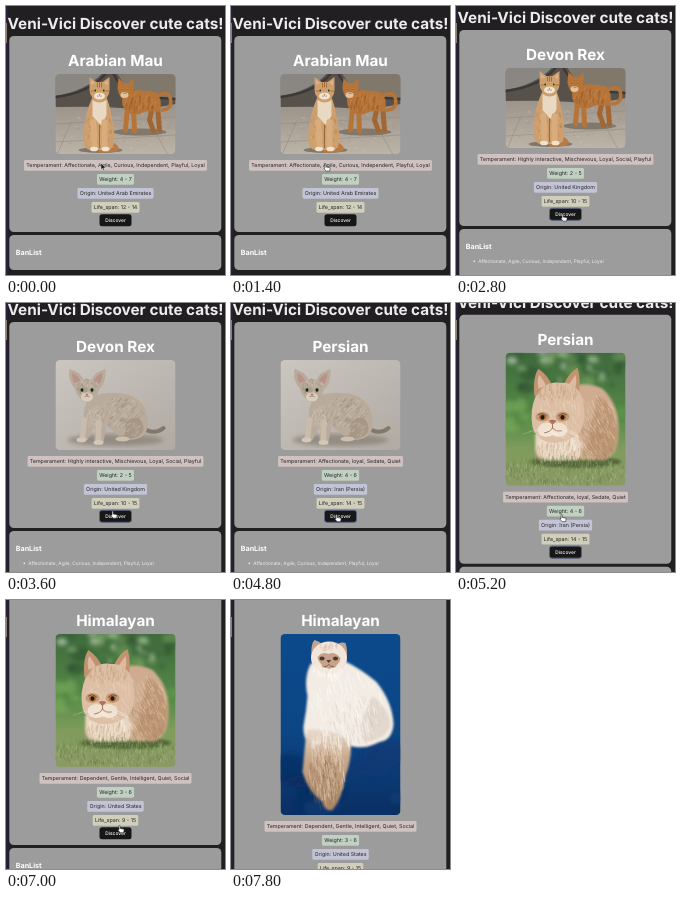
These frames come from a looping animation (219 px wide and 269 px high, 8000 ms). An HTML page:

```html
<!DOCTYPE html>
<html lang="en">
<head>
<meta charset="utf-8">
<title>Discover cute cats</title>
<style>
  html, body { margin: 0; width: 100%; height: 100%; overflow: hidden; background: #211f21; }
  svg { display: block; width: 219px; height: 269px; }
  text { font-family: Inter, "Open Sans", sans-serif; text-rendering: geometricPrecision; }
  .h1 { font-size: 15.3px; font-weight: 700; text-anchor: middle; fill: #fff; }
  .h3 { font-size: 7.15px; font-weight: 700; fill: #fff; }
  .label { font-size: 5.35px; text-anchor: middle; fill: #262426; }
  .button { font-size: 4.9px; font-weight: 500; text-anchor: middle; fill: #fff; }
  .item { font-size: 4.77px; fill: #eee; }
</style>
</head>
<body>
<svg viewBox="0 0 219 269">
  <defs>
    <linearGradient id="ground" x2="0" y2="1"><stop offset=".3" stop-color="#978e84"/><stop offset="1" stop-color="#bdb4a8"/></linearGradient>
    <linearGradient id="studio" x2="1" y2="1"><stop stop-color="#cbc6c0"/><stop offset="1" stop-color="#b0aaa3"/></linearGradient>
    <linearGradient id="garden" x2="0" y2="1"><stop stop-color="#3f6a3c"/><stop offset=".5" stop-color="#578a48"/><stop offset=".72" stop-color="#7f9c5c"/><stop offset="1" stop-color="#8c9a66"/></linearGradient>
    <linearGradient id="cloth" x2="0" y2="1"><stop stop-color="#0b4a8c"/><stop offset=".55" stop-color="#0c4584"/><stop offset="1" stop-color="#0a2f64"/></linearGradient>
    <linearGradient id="tail" x2="0" y2="1"><stop stop-color="#e9dccf"/><stop offset=".35" stop-color="#c9a98c"/><stop offset="1" stop-color="#a98462"/></linearGradient>
    <filter id="soft"><feGaussianBlur stdDeviation=".45"/></filter>
    <filter id="fluff"><feGaussianBlur stdDeviation="1.1"/></filter>
    <filter id="blur"><feGaussianBlur stdDeviation="2.2"/></filter>
  </defs>
  <rect width="219" height="269" fill="#211f21"/>
  <rect width="1.6" height="269" fill="#2b2140"/>
  <rect y="17" width="1" height="20" fill="#8a7d74"/>
  <g id="page">
    <text class="h1" x="109.5" y="22.7" style="fill:#ececec">Veni-Vici Discover cute cats!</text>
    <rect id="card" x="3.3" y="30" width="212" rx="4.5" fill="#9c9c9c"/>
    <text id="name" class="h1" x="109.5" y="60"></text>
    <g id="photo" transform="translate(49.5 68)"></g>
    <g id="below">
      <g id="labels"></g>
      <rect id="button" x="93.5" y="60.3" width="32" height="12" rx="2.5" fill="#171717"/>
      <text class="button" x="109.5" y="68">Discover</text>
      <rect id="banCard" x="3.3" y="81" width="212" rx="4.5" fill="#9c9c9c"/>
      <text class="h3" x="9.8" y="101">BanList</text>
      <g id="ban">
        <circle cx="18.3" cy="113.4" r=".8" fill="#eee"/>
        <text class="item" x="22.3" y="115">Affectionate, Agile, Curious, Independent, Playful, Loyal</text>
      </g>
    </g>
  </g>
  <g id="cursor">
    <path id="arrow" d="M0 0V6.6L1.5 5.3L2.5 7.5L3.6 7L2.6 4.9H4.7Z" fill="#111" stroke="#eee" stroke-width=".5"/>
    <path id="hand" d="M0 .7Q0 0 .65 0T1.3 .7V3L4.5 3.5Q5.2 3.8 5.1 4.6L4.6 7.2H1.2L-1 4.7Q-1 3.7 0 4.2Z" fill="#fff" stroke="#222" stroke-width=".6"/>
  </g>
</svg>
<script>
const LOOP = 8000, STEP = 200;
const $ = id => document.getElementById(id);

const breeds = [
  { at: 0, name: 'Arabian Mau', facts: ['Affectionate, Agile, Curious, Independent, Playful, Loyal', '4 - 7', 'United Arab Emirates', '12 - 14'] },
  { at: 2600, name: 'Devon Rex', facts: ['Highly interactive, Mischievous, Loyal, Social, Playful', '2 - 5', 'United Kingdom', '10 - 15'] },
  { at: 4400, name: 'Persian', facts: ['Affectionate, loyal, Sedate, Quiet', '4 - 6', 'Iran (Persia)', '14 - 15'] },
  { at: 6800, name: 'Himalayan', facts: ['Dependent, Gentle, Intelligent, Quiet, Social', '3 - 6', 'United States', '9 - 15'] }
];
const fields = [['Temperament', '#d0c2c0'], ['Weight', '#c0d0c1'], ['Origin', '#c2c4d5'], ['Life_span', '#d0cfbc']];
const photos = [
  { at: 0, h: 80, draw: street },
  { at: 3200, h: 90, draw: kitten },
  { at: 5000, h: 133, draw: lawn },
  { at: 7400, h: 181, draw: fluffy }
];
const scroll = [[0, 0], [1400, 0], [1600, 6], [3200, 6], [3600, 11], [5000, 11], [5600, 32.5], [6600, 32.5], [6800, 34]];
const pointer = [[0, 95, 157], [600, 94, 158], [1600, 94, 158], [2400, 106, 208], [3600, 106, 208], [4000, 105, 211.5], [5200, 105, 211.5], [5800, 115.7, 207.5], [6200, 115.7, 207.5], [6800, 113, 225.5]];

// Drawing helpers for the photos
let seed = 7;
const rnd = () => (seed = (seed * 16807) % 2147483647) / 2147483647;
const n1 = v => v.toFixed(1);
const path = (d, fill, extra = '') => `<path d="${d}" fill="${fill}" ${extra}/>`;
const line = (d, color, w, extra = '') => path(d, 'none', `stroke="${color}" stroke-width="${w}" stroke-linecap="round" stroke-linejoin="round" ${extra}`);
const oval = (x, y, rx, ry, fill, extra = '') => `<ellipse cx="${x}" cy="${y}" rx="${rx}" ry="${ry}" fill="${fill}" ${extra}/>`;
const back = (h, id) => `<rect width="120" height="${h}" fill="url(#${id})"/>`;
const soft = (s, id = 'soft') => `<g filter="url(#${id})">${s}</g>`;

// Short strokes scattered in an oval, leaning along (dx, dy)
function hair(x, y, rx, ry, color, n, dx, dy, w = .7) {
  let d = '';
  for (let i = 0; i < n; i++) {
    const a = rnd() * Math.PI * 2, r = Math.sqrt(rnd()), k = .5 + rnd();
    d += `M${n1(x + Math.cos(a) * rx * r)} ${n1(y + Math.sin(a) * ry * r)}l${n1(dx * k + rnd() - .5)} ${n1(dy * k)}`;
  }
  return line(d, color, w, 'opacity=".45"');
}

// Blurred spots scattered over a box
function spots(x, y, w, h, n, size, colors) {
  let s = '';
  for (let i = 0; i < n; i++)
    s += oval(n1(x + rnd() * w), n1(y + rnd() * h), n1(size * (.5 + rnd())), n1(size * (.4 + rnd() * .8)), colors[i % colors.length], 'opacity=".6"');
  return soft(s, 'blur');
}

function face(x, y, gap, eye, r, nose) {
  const eyes = [-gap, gap].map(g => oval(x + g, y, r, r * .8, eye) + oval(x + g, y, r * .5, r * .7, '#201a16')).join('');
  return eyes + path(`M${x - r * .7} ${y + gap * .75}h${r * 1.4}l${-r * .7} ${r}Z`, nose)
    + line(`M${x - gap * .5} ${y + gap * 1.3}q${gap * .25} ${r * .4} ${gap * .5} ${-r * .3}q${gap * .25} ${r * .7} ${gap * .5} ${r * .3}`, '#6d4a38', .5);
}

function street() {
  const o = '#b67438', tan = '#cd9f6e';
  return back(80, 'ground') + soft(
    path('M0 0H120V30Q92 36 66 34T0 33Z', '#57514b') +
    path('M0 0H46Q30 17 0 22Z', '#8a8782') +
    path('M62 0H120V24Q88 27 72 16Z', '#81786c') +
    line('M0 23Q34 19 50 0M58 0Q68 23 120 25', '#3c3835', 2.4) +
    hair(60, 58, 60, 20, '#d0c8bc', 60, 2, .2) + hair(60, 58, 60, 20, '#928779', 60, 2, .2) +
    line('M0 50L120 43M0 68L120 61M16 47L2 80M92 44L112 80', '#958b7f', .6) +
    oval(84, 58, 27, 3.5, '#81776b') + oval(45, 76, 22, 3, '#81776b')
  ) + soft(
    line('M101 23Q113 15 115 25T107 36', o, 3.5) +
    line('M72 33L70 56M78 34L79 57', o, 5) + line('M97 32L94 46L98 57M102 31L104 56', '#a36631', 5) +
    path('M66 17Q84 15 100 18Q108 25 104 38Q92 35 84 40Q71 43 67 31Z', o) +
    hair(86, 28, 16, 8, '#8b5226', 34, -.8, 4, .9) + hair(86, 26, 16, 8, '#d19659', 28, -.8, 3) +
    path('M62 13L63 4L68 9H73L78 4L78 16Q76 25 70 25T62 15Z', o) +
    oval(69, 21, 4, 3, '#e0c39e') + face(69.5, 15.5, 3, '#d9c15e', 1.1, '#a5674d') +
    line('M55 69Q65 75 59 76L45 77', '#b87b44', 4) +
    path('M37 23Q30 38 28 58Q26 76 36 76H54Q61 72 58 55Q56 36 51 23Z', tan) +
    hair(43, 51, 14, 20, '#aa7141', 55, .8, 3) + hair(42, 55, 13, 19, '#dfb88b', 55, .5, 3) +
    path('M37 26Q44 31 51 26L51 42L45 51L37 42Z', '#ead9c2') +
    line('M38 48L39 74M49 48L49 74', '#d9ac7c', 6) + line('M44 51V74', '#8f6340', .9) +
    oval(38.5, 75, 4, 2.3, '#efe3d1') + oval(50, 75, 4, 2.3, '#efe3d1') +
    path('M34 15L34 3L41 8H47L54 3L54 16Q54 25 44 27Q34 25 34 15Z', tan) +
    path('M35.5 11L35.5 6L39.5 9Z M52.5 11L52.5 6L48.5 9Z', '#dfb099') +
    line('M42 9V13M44 8V13M46 9V13M36 17h3M50 17h3', '#9a6134', .8) +
    oval(44, 22, 5.5, 3.6, '#f0e4d2') + face(44, 16.5, 4.3, '#c8b84f', 1.6, '#c27f6a'));
}

function kitten() {
  const fur = '#b9ab9b', dark = '#85786a';
  return back(90, 'studio') + soft(oval(60, 80, 48, 6, '#938c83'), 'blur') + soft(
    line('M85 67Q99 76 108 68', dark, 4) +
    path('M35 37Q57 29 77 36Q94 45 92 67Q90 80 72 80L62 75L51 65L48 82L39 83L39 66L32 80L23 80L29 61Q26 47 35 37Z', fur) +
    hair(65, 52, 23, 15, dark, 110, -1.8, 2.3) + hair(65, 52, 23, 15, '#d8cbbb', 110, -1.5, 2) +
    hair(39, 58, 8, 14, '#dbcfc0', 55, .3, 2.5) +
    path('M71 61Q85 52 88 67Q88 78 72 79H61Q60 76 69 75Z', '#a69786') +
    hair(77, 69, 9, 7, '#d6c8b8', 30, -1.5, 1.5) +
    line('M29 60L27 78M43 62L43 81', '#c9bcad', 5.5) +
    oval(26, 80, 5, 2.4, '#d3c7b9') + oval(43, 82.5, 5, 2.5, '#d3c7b9') + oval(67, 79, 7, 2.5, '#cdbfae') +
    path('M19 28Q12 20 14 9Q23 11 28 19H36Q41 11 50 9Q51 22 44 29Q41 39 32 43Q22 39 19 28Z', fur) +
    path('M19 23Q16 18 17 13Q22 15 25 21Z M44 24Q47 19 47 13Q41 15 38 21Z', '#b8928a') +
    hair(32, 26, 10, 8, dark, 40, .3, 2) + hair(32, 25, 10, 8, '#d8ccbd', 30, .3, 2) +
    oval(31.5, 37, 6, 4.5, '#d9cdbf') + face(31.5, 30, 5, '#8f9a72', 2.6, '#a37e74'));
}

function lawn() {
  const cream = '#dcbfa4', warm = '#c0946f';
  return back(133, 'garden') +
    spots(0, 0, 120, 50, 26, 7, ['#2c4f2e', '#6f9a5c', '#37603a']) +
    spots(0, 0, 60, 28, 9, 4, ['#d5dfcf', '#8fb27c']) + spots(80, 0, 40, 30, 7, 4, ['#b9cfa8', '#7ea568']) +
    spots(0, 52, 120, 30, 16, 7, ['#5f9a4b', '#7bab5a']) + soft(
      oval(70, 109, 46, 6, '#56683a') +
      path('M52 38Q78 26 97 36Q114 52 113 78Q113 104 98 107H40Q27 106 30 92Q34 72 52 38Z', '#cfac8f') +
      path('M92 42Q112 56 112 80Q111 104 96 106Q76 104 84 82Z', '#bd9676') +
      path('M30 82Q45 74 72 80Q82 96 72 107H40Q28 105 30 82Z', '#e8d5c1'), 'fluff') +
    soft(
      hair(88, 70, 22, 30, '#ead3ba', 150, 2, 4) + hair(90, 84, 20, 20, '#a47c5a', 80, 2, 4) +
      hair(52, 92, 20, 13, '#fbf1e4', 100, -.5, 5) + hair(54, 95, 22, 10, '#b8946f', 50, -.5, 5) +
      path('M29 44Q27 24 33 16Q43 23 47 34Z M58 32Q64 19 72 15Q76 28 73 42Z', warm) +
      path('M33 36Q31 26 34 22L41 33Z M63 32L70 22Q72 30 69 37Z', '#e0b9a2') +
      path('M30 44Q40 27 55 30Q71 29 77 46Q82 68 74 80Q62 91 46 90Q31 88 27 74Q24 58 30 44Z', cream) +
      hair(52, 42, 20, 10, warm, 70, .2, -4) + hair(54, 60, 22, 22, '#f0dcc6', 110, 1, 4) +
      oval(37, 64, 7, 5, '#c39c7c') + oval(57, 64, 7, 5, '#c39c7c') +
      oval(41, 77, 9, 7, '#f0e0ce') + oval(53, 77, 9, 7, '#f0e0ce') +
      oval(37, 64.5, 3.6, 2.9, '#b8732c') + oval(57, 64.5, 3.6, 2.9, '#b8732c') +
      oval(37, 64.5, 2, 2.3, '#221914') + oval(57, 64.5, 2, 2.3, '#221914') +
      line('M33 62Q37 59 41 63M53 63Q57 59 61 62', '#684733', 1) +
      path('M43 68Q47 66 51 68L47 72Z', '#b66e5c') +
      line('M47 72V75M39 80Q45 79 47 75Q50 79 56 78', '#8a5e48', .8) +
      hair(39, 79, 14, 4, '#fff', 18, -6, 2, .4) + hair(56, 80, 12, 4, '#fff', 18, 8, 3, .4)) +
    soft(hair(60, 120, 64, 15, '#c0c68e', 170, .5, -3) + hair(60, 120, 64, 15, '#566f3c', 170, -.5, -3) +
      hair(60, 112, 60, 7, '#71914d', 90, .5, -5));
}

function fluffy() {
  const white = '#f3ece5', brown = '#a5765a';
  return back(181, 'cloth') + spots(0, 110, 120, 65, 12, 14, ['#0a2c60', '#0c3a74']) + soft(
    path('M30 30Q48 22 66 28Q82 36 96 48Q112 68 113 90Q112 106 99 108Q84 116 70 112L40 118Q22 112 23 92Q26 76 27 62Q23 44 30 30Z', white) +
    path('M92 62Q110 76 110 92Q104 106 84 108Q76 92 92 62Z', '#e3d8ce') +
    path('M26 96Q44 92 70 106Q72 124 65 142Q62 164 52 176Q44 178 42 168Q28 158 22 138Q24 116 26 96Z', 'url(#tail)'), 'fluff') +
    soft(
      hair(66, 70, 36, 34, '#fff', 150, 1.5, 6) + hair(76, 84, 28, 24, '#cfc2b6', 70, 1.5, 6) +
      hair(44, 140, 17, 28, '#8a6448', 110, .8, 7) + hair(46, 130, 18, 32, '#f0dfcd', 110, .8, 7) +
      hair(50, 104, 20, 9, '#fff8f0', 80, .5, 7) +
      path('M31 24Q30 10 34 6Q41 8 46 14Z M53 13Q59 7 65 9Q68 17 65 27Z', '#c3a38d') +
      oval(48.5, 24, 18, 16.5, '#f2e6db') + hair(48, 36, 15, 7, '#fff', 60, 0, 4) +
      hair(48, 14, 11, 4, '#c6a58b', 24, 0, -3) +
      path('M37 23Q42 17 48 20Q54 17 60 24Q60 31 49 35Q38 31 37 23Z', brown, 'opacity=".6"') +
      oval(45, 31, 4, 3, '#c7a48a') + oval(52, 31, 4, 3, '#c7a48a') +
      oval(41.5, 24.5, 2.6, 1.9, '#563725') + oval(55, 24.5, 2.6, 1.9, '#563725') +
      path('M45.8 26H50.6L48.2 29Z', '#593a2b') + line('M44 32.5Q46.5 33 48.2 30.5Q50 33 53 32.5', '#6d4a38', .7));
}

$('photo').innerHTML = photos.map((p, i) =>
  `<clipPath id="clip${i}"><rect width="120" height="${p.h}" rx="4.5"/></clipPath><g id="photo${i}" clip-path="url(#clip${i})">${p.draw()}</g>`).join('');
$('labels').innerHTML = fields.map(([, color], i) =>
  `<rect y="${6 + 14 * i}" height="10.7" rx="1.4" fill="${color}"/><text class="label" x="109.5" y="${13.2 + 14 * i}"></text>`).join('');

const latest = (list, t) => list.findLastIndex(s => s.at <= t);

function at(track, t, k) {
  const i = track.findLastIndex(p => p[0] <= t), a = track[i], b = track[i + 1];
  return b ? a[k] + (b[k] - a[k]) * (t - a[0]) / (b[0] - a[0]) : a[k];
}

const show = (id, on) => $(id).setAttribute('display', on ? 'inline' : 'none');

function render(t) {
  const breed = breeds[latest(breeds, t)], pic = latest(photos, t);
  const bottom = 68 + photos[pic].h, banned = t >= 1600, focused = t >= 2600 && t < 5400;
  $('name').textContent = breed.name;
  document.querySelectorAll('.label').forEach((label, i) => {
    label.textContent = `${fields[i][0]}: ${breed.facts[i]}`;
    const w = label.getComputedTextLength() + 4.4, box = label.previousElementSibling;
    box.setAttribute('x', 109.5 - w / 2);
    box.setAttribute('width', w);
  });
  photos.forEach((p, i) => show('photo' + i, i === pic));
  $('card').setAttribute('height', bottom + 78 - 30);
  $('banCard').setAttribute('height', banned ? 49 : 35);
  show('ban', banned);
  $('below').setAttribute('transform', `translate(0 ${bottom})`);
  $('page').setAttribute('transform', `translate(0 ${-at(scroll, t, 1)})`);
  $('button').setAttribute('stroke', focused ? '#59627f' : 'none');
  show('arrow', t < 600);
  show('hand', t >= 600);
  show('cursor', t < 7400);
  $('cursor').setAttribute('transform', `translate(${at(pointer, t, 1)} ${at(pointer, t, 2)})`);
}

const start = performance.now();
let last = -1;
function tick() {
  const t = Math.floor((performance.now() - start) % LOOP / STEP) * STEP;
  if (t !== last) render(last = t);
  requestAnimationFrame(tick);
}
tick();
</script>
</body>
</html>
```
